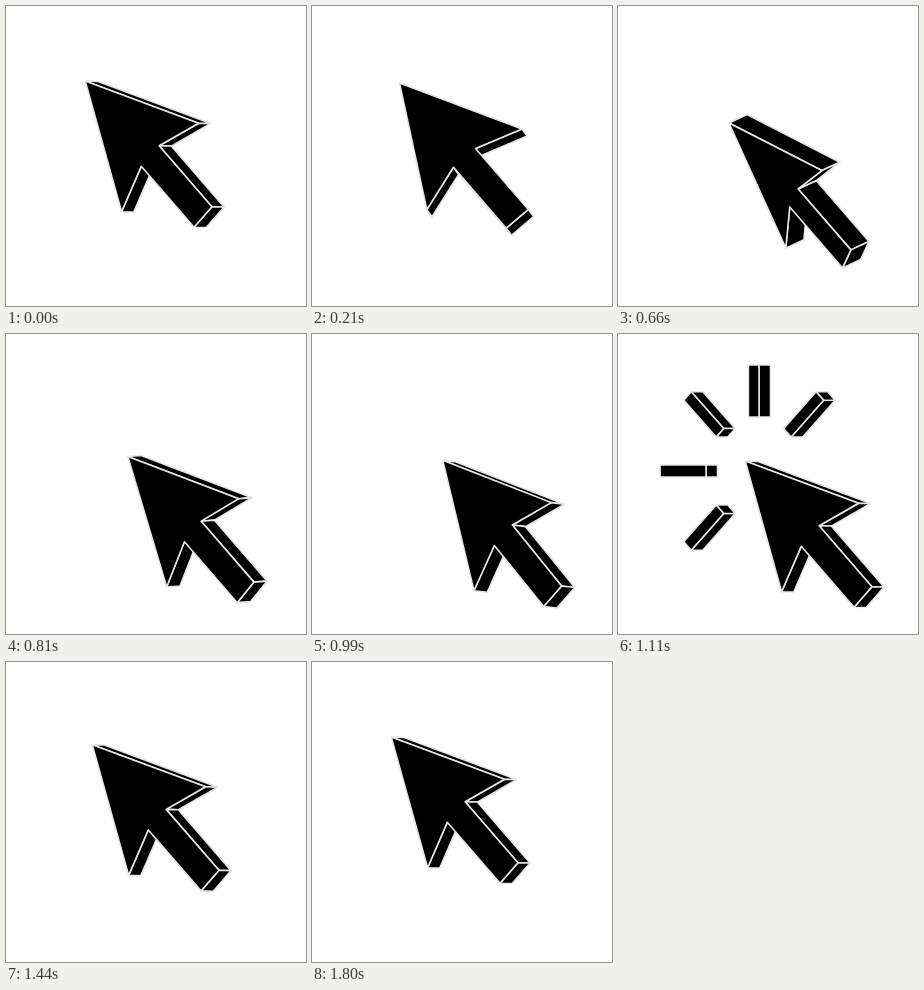
An HTML page with a canvas that plays this animation: 300 px wide and 300 px high, repeating every 1.83 s.

```html
<!DOCTYPE html>
<html lang="en">
<head>
<meta charset="utf-8">
<title>Click</title>
<style>
  html, body { margin: 0; width: 100%; height: 100%; overflow: hidden; background: #fff; }
  canvas { display: block; width: 100vw; height: 100vh; }
</style>
</head>
<body>
<canvas id="stage"></canvas>
<script>
const SIZE = 300, LOOP = 1830, STEP = 30;
const RAD = Math.PI / 180;
const canvas = document.getElementById('stage');
const ctx = canvas.getContext('2d');
const ratio = window.devicePixelRatio || 1;
canvas.width = canvas.height = SIZE * ratio;
ctx.scale(ratio, ratio);

const clamp = x => Math.max(0, Math.min(1, x));
const span = (t, from, to) => clamp((t - from) / (to - from));
const ease = p => (1 - Math.cos(Math.PI * p)) / 2;

// Axes of the arrow: along the shaft, across it, and through its thickness
const TILT = 0.36, FLAT = Math.sqrt(1 - TILT * TILT);
const UX = 0.655, UY = 0.756;
const ALONG = [UX * FLAT, UY * FLAT, -TILT];
const ACROSS = [UY, -UX, 0];
const THROUGH = [UX * TILT, UY * TILT, FLAT];

const DEPTH = 24.5;
const PIVOT = 95 / FLAT;
const ARROW = [
  [0, 0], [114.3, 62.4], [99.2, 14.5], [179.8, 14.5],
  [179.8, -14.5], [99.2, -14.5], [114.3, -62.4]
].map(([s, t]) => [s / FLAT, t]);

function path(points) {
  ctx.beginPath();
  points.forEach(([x, y]) => ctx.lineTo(x, y));
  ctx.closePath();
  ctx.fill();
  ctx.stroke();
}

// Extrudes the near face by (ox, oy), walls drawn far to near
function prism(face, ox, oy) {
  const walls = [];
  face.forEach((a, i) => {
    const b = face[(i + 1) % face.length];
    const facing = (b[1] - a[1]) * ox - (b[0] - a[0]) * oy;
    if (facing > 0) {
      walls.push({
        order: (a[0] + b[0]) * ox + (a[1] + b[1]) * oy,
        points: [a, b, [b[0] + ox, b[1] + oy], [a[0] + ox, a[1] + oy]]
      });
    }
  });
  walls.sort((p, q) => p.order - q.order).forEach(w => path(w.points));
  path(face);
}

function drawArrow(x, y, spin, yaw) {
  // The arrow looks the same from both sides
  const phi = (spin > 90 ? spin - 180 : spin) * RAD;
  const c = Math.cos(phi), s = Math.sin(phi);
  const cy = Math.cos(yaw * RAD), sy = Math.sin(yaw * RAD);
  const place = (len, wide, deep) => {
    const v = wide * c - deep * s, w = wide * s + deep * c;
    const p = [0, 1, 2].map(i => (len - PIVOT) * ALONG[i] + v * ACROSS[i] + w * THROUGH[i]);
    return [
      x + PIVOT * ALONG[0] + p[0] * cy + p[2] * sy,
      y + PIVOT * ALONG[1] + p[1]
    ];
  };
  const face = ARROW.map(([len, wide]) => place(len, wide, -DEPTH / 2));
  const near = place(0, 0, -DEPTH / 2), far = place(0, 0, DEPTH / 2);
  prism(face, far[0] - near[0], far[1] - near[1]);
}

function drawRays(inner, outer) {
  if (outer - inner < 1) return;
  const turn = 28 * RAD, half = 6;
  for (let i = 0; i < 5; i++) {
    const angle = (135 + 45 * i) * RAD;
    const dx = Math.cos(angle), dy = Math.sin(angle);
    const at = (r, w) => [135.7 + (dx * r - dy * w) * Math.cos(turn), 137 + dy * r + dx * w];
    prism([at(inner, -half), at(outer, -half), at(outer, half), at(inner, half)],
      DEPTH * Math.sin(turn), 0);
  }
}

function draw(t) {
  ctx.fillStyle = '#fff';
  ctx.fillRect(0, 0, SIZE, SIZE);
  ctx.fillStyle = '#000';
  ctx.strokeStyle = '#e6e6e6';
  ctx.lineWidth = 1.6;
  ctx.lineJoin = 'round';

  const travel = ease(span(t, 0, 1020)) - ease(span(t, 1260, 1500));
  const press = 6 * Math.sin(Math.PI * span(t, 870, 1110)) ** 2;
  // Spinning along with the press keeps the face turned to the viewer
  const spin = -21.5 + 180 * ease(span(t, 0, 900)) + 0.7 * press;

  const inner = 54 + 52 * ease(span(t, 1290, 1440));
  const outer = 54 + 52 * span(t, 1020, 1080);
  drawRays(inner, outer);
  drawArrow(85.3 + 48 * travel, 75.2 + 52 * travel, spin, press);
}

function tick() {
  const t = performance.now() % LOOP;
  draw(Math.floor(t / STEP) * STEP);
  requestAnimationFrame(tick);
}
tick();
</script>
</body>
</html>
```
